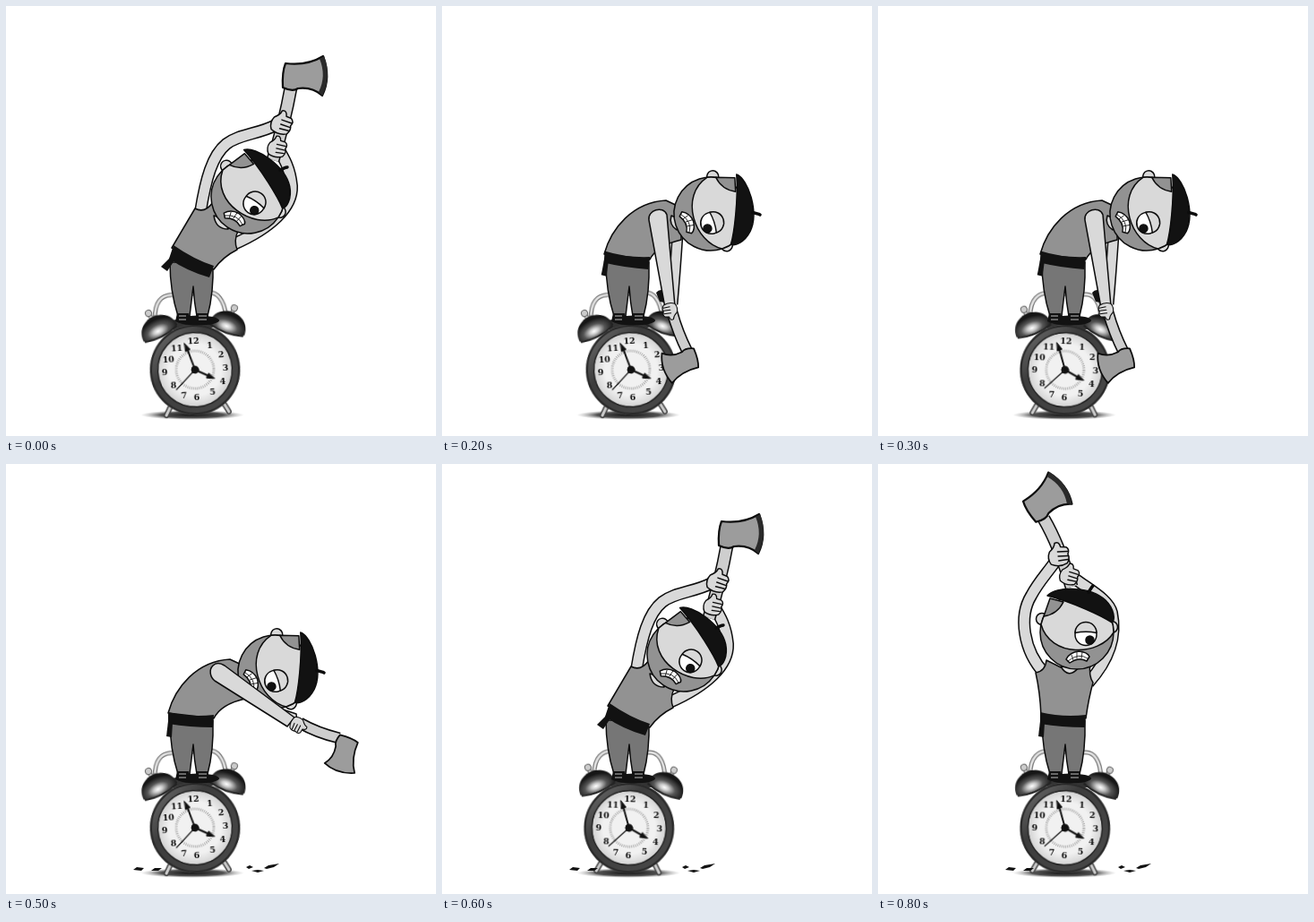
Recreate the animation shown at these times as an HTML page without scripts. Size 480 by 480 pixels, loop 0.9 s.

```html
<!DOCTYPE html>
<html lang="en">
<head>
<meta charset="utf-8">
<title>Chopping the alarm clock</title>
<style>
html, body { margin: 0; width: 100%; height: 100%; overflow: hidden; background: #fff; }
svg { display: block; width: 100%; height: 100%; }
.line { fill: none; }
.ink { stroke: #0c0c0c; stroke-width: 1.5; stroke-linejoin: round; stroke-linecap: round; }
.skin { fill: #d9d9d9; }
.shirt { fill: #929292; }
.pants { fill: #767676; }
.steel { fill: #9c9c9c; stroke-width: 2.2; }
.black { fill: #121212; }
.rim { fill: none; stroke: #0c0c0c; stroke-width: 14; }
.fill { fill: none; stroke: #d9d9d9; stroke-width: 11; }
.grip .rim { stroke-width: 15; }
.grip .fill { stroke: #cecece; stroke-width: 12; }
.thin .rim { stroke-width: 13; }
.thin .fill { stroke-width: 10; }
.num { font: 700 9.5px "DejaVu Serif", "Noto Serif", serif; text-anchor: middle; fill: #111; }

/* nine beats of 100 ms */
.pose, .chips, .clock { animation: 900ms step-end infinite; }
.pose, .chips { visibility: hidden; }
.raised { animation-name: raised; }
.lean { animation-name: lean; }
.swing { animation-name: swing; }
.hit { animation-name: hit; }
.fly { animation-name: fly; }
.fallen { animation-name: fallen; }
.clock { animation-name: wobble; transform-origin: 210px 406px; }
@keyframes raised { 0% { visibility: hidden } 88.8%, 100% { visibility: visible } }
@keyframes lean { 0%, 66.6% { visibility: visible } 11.1%, 88.8%, 100% { visibility: hidden } }
@keyframes swing { 0%, 22.2%, 66.6%, 100% { visibility: hidden } 11.1%, 55.5% { visibility: visible } }
@keyframes hit { 0%, 55.5%, 100% { visibility: hidden } 22.2% { visibility: visible } }
@keyframes fly { 0%, 55.5%, 100% { visibility: hidden } 44.4% { visibility: visible } }
@keyframes fallen { 0% { visibility: hidden } 55.5%, 100% { visibility: visible } }
@keyframes wobble {
  0%, 22.2%, 44.4%, 77.7% { transform: translate(1px, 0) rotate(-3.5deg) }
  11.1%, 33.3%, 66.6%, 88.8%, 100% { transform: translate(-1.2px, .2px) rotate(1.8deg) }
}
</style>
</head>
<body>
<svg viewBox="0 0 480 480">
<defs>
  <radialGradient id="chrome" cx=".47" cy=".72" r=".55">
    <stop offset="0" stop-color="#fff"/><stop offset=".22" stop-color="#ccc"/>
    <stop offset=".55" stop-color="#555"/><stop offset="1" stop-color="#161616"/>
  </radialGradient>
  <linearGradient id="ring" x2="1" y2="1">
    <stop offset="0" stop-color="#777"/><stop offset=".35" stop-color="#3c3c3c"/>
    <stop offset="1" stop-color="#4a4a4a"/>
  </linearGradient>
  <radialGradient id="dial">
    <stop offset=".7" stop-color="#f1f1f1"/><stop offset="1" stop-color="#d2d2d2"/>
  </radialGradient>
  <radialGradient id="shade">
    <stop offset="0" stop-color="#111"/><stop offset=".6" stop-color="#333" stop-opacity=".85"/>
    <stop offset="1" stop-color="#999" stop-opacity="0"/>
  </radialGradient>

  <g id="head" class="ink">
    <circle class="skin" cx="-39" cy="-15" r="6.500"/>
    <circle class="skin" cx="39" cy="-6" r="6.500"/>
    <circle class="shirt" r="41"/>
    <path class="skin" d="M-40 -9C-30 28 25 27 41 0A41 41 0 0 0 -40 -9z"/>
    <path class="shirt" d="M-37 -18Q-22 -20 -15 -34L-30 -38z"/>
    <circle cx="10" cy="2.500" r="12" fill="#fff"/>
    <path class="skin" d="M-2 .5A12 12 0 0 1 22 .5Q10 -2 -2 .5z"/>
    <circle class="black" cx="14.500" cy="8.500" r="4.500"/>
    <path d="M-12 30Q-8 22 2 21Q12 22 14 27L11 32Q2 27 -8 34z" fill="#fff"/>
    <path class="line" stroke-width=".8" d="M-10 32Q2 22 12 29M-6 25L-4 31M0 22V29M6 22L5 29"/>
    <path class="black" d="M-33 -41C-24 -52 15 -52 32 -36C42 -26 43 -14 39 -11C29 -18 -5 -34 -33 -41z"/>
    <path class="line" stroke-width="3.500" d="M13 -45L17 -51L18 -52"/>
  </g>

  <path id="axe" class="ink steel" d="M-6 -28Q18 -25 36 -36Q45 -12 35 8Q24 -2 8 0Q2 4 -9 -1Q-10 -18 -6 -28z"/>
  <path id="edge" fill="#2a2a2a" d="M32 -33L37 -36Q46 -12 35 8L31 4Q40 -14 32 -33z"/>

  <g id="fist" class="ink skin">
    <path d="M-9 -5Q-3 -9 -2 -14Q3 -16 4 -9L10 -8Q14 -5 11 0Q13 5 9 10Q0 14 -9 9Q-13 2 -9 -5z"/>
    <path class="line" d="M0 -4L11 -3M0 1L11 2M0 6L10 6"/>
  </g>

  <g id="bell">
    <path d="M-21 0C-21 -27 21 -27 21 0Q0 7 -21 0z" fill="url(#chrome)"/>
    <path d="M-20 1Q0 7 20 1" fill="none" stroke="#222" stroke-width="2"/>
  </g>
  <g id="knob" fill="#ccc" stroke="#666">
    <path d="M-2 2H2V13H-2z"/><circle r="3.500"/><path d="M-5 6H5V9H-5z"/>
  </g>

  <g id="belt">
    <path class="black" d="M181 277Q206 283 232 280L231 294Q205 294 181 290z"/>
    <path class="black" d="M181 287L179 304L185 305L186 289z"/>
  </g>
  <path id="bent" class="ink shirt" d="M181 278C189 249 213 220 250 218L267 226V262Q240 268 232 284z"/>

  <path id="armA1" d="M186 234C162 208 157 170 171 147C179 132 187 124 197 110"/>
  <path id="armA2" d="M235 244C261 215 266 190 261 166C257 151 238 142 217 126"/>
  <path id="gripA" d="M216 137Q202 90 185 61"/>
  <path id="armB1" d="M217 230C223 193 230 167 246 154C260 143 282 143 301 133"/>
  <path id="armB2" d="M254 266C295 248 320 225 319 201C317 181 311 171 303 158"/>
  <path id="gripB" d="M298 172Q311 130 318 91"/>
  <path id="gripC" d="M328 289Q347 300 372 306"/>
  <path id="gripD" d="M257 342Q263 364 274 386"/>
  <path id="armD" d="M263 255Q260 300 257 333"/>
  <path id="arch" d="M169 347C169 328 178 321 188 321H231C240 321 247 330 248 347"/>
  <path id="feet" d="M182 442L175 455M238 442L245 455"/>
</defs>

<rect width="480" height="480" fill="#fff"/>
<ellipse cx="208" cy="456.500" rx="58" ry="5.500" fill="url(#shade)"/>

<g class="clock">
  <g fill="none" stroke-linecap="round">
    <use href="#arch" stroke="#777" stroke-width="5"/>
    <use href="#arch" stroke="#e2e2e2" stroke-width="2.500"/>
    <use href="#feet" stroke="#444" stroke-width="6"/>
    <use href="#feet" stroke="#ccc" stroke-width="3"/>
  </g>
  <use href="#knob" transform="translate(162 340) rotate(-28)"/>
  <use href="#knob" transform="translate(258 340) rotate(28)"/>
  <path d="M188 349H232L237 360H184z" fill="#333"/>
  <use href="#bell" transform="translate(174 363) rotate(-24)"/>
  <use href="#bell" transform="translate(248 363) rotate(24)"/>
  <circle cx="210" cy="406" r="50.500" fill="url(#ring)"/>
  <circle cx="210" cy="406" r="49" fill="none" stroke="#292929" stroke-width="2"/>
  <circle cx="210" cy="406" r="41.500" fill="url(#dial)" stroke="#222" stroke-width="1.500"/>
  <circle cx="210" cy="406" r="21" fill="none" stroke="#999" stroke-width="3" stroke-dasharray=".8 1.400"/>
  <g class="num">
    <text x="210" y="377">12</text><text x="228" y="383">1</text><text x="240" y="394">2</text>
    <text x="244" y="409">3</text><text x="240" y="424">4</text><text x="228" y="435">5</text>
    <text x="210" y="440">6</text><text x="196" y="437">7</text><text x="185" y="425">8</text>
    <text x="176" y="410">9</text><text x="181" y="396">10</text><text x="191" y="384">11</text>
  </g>
  <g stroke="#111" fill="#111" stroke-linecap="round">
    <path d="M210 406L188 427" stroke-width="1.100"/>
    <path d="M210 406L202 380M210 406L227 415" stroke-width="2"/>
    <path d="M200 376L206 383L201 385zM231 417L222 416L225 411z"/>
    <circle cx="210" cy="406" r="4"/>
  </g>
</g>

<g class="chips fly black">
  <path d="M114 430l9 -5 3 4 -7 4zM130 441l8 -4 4 3 -7 4zM145 419l5 -5 3 5z"/>
  <path d="M272 437l7 -4 6 3 -8 4zM291 424l10 -6 4 2 -9 6zM286 446l6 -2 4 3z"/>
</g>
<g class="chips fallen black">
  <path d="M142 453l4 -3 8 1 -3 3zM162 454l4 -3 8 0 -4 3z"/>
  <path d="M268 450l4 -2 4 2 -5 2zM274 454l7 -1 7 1 -7 2zM288 451l5 -3 12 -2 -6 4 -8 2z"/>
</g>

<!-- legs and shoes -->
<ellipse class="black" cx="214" cy="351" rx="24" ry="5.500"/>
<path class="ink pants" d="M183 286Q183 318 192 346H205Q207 330 209 313Q210 330 213 346H225Q232 320 231 286z"/>
<path class="black" d="M191 343H204V352Q197 356 189 352zM212 343H226V352Q219 357 212 354z"/>
<path d="M193 346H201M193 350H201M215 346H224M215 350H224" stroke="#bbb" stroke-width="1"/>

<g class="pose raised">
  <use href="#armA1" class="rim"/><use href="#armA1" class="fill"/>
  <use href="#armA2" class="rim"/><use href="#armA2" class="fill"/>
  <path class="ink shirt" d="M176 233Q187 231 188 219L204 227H226L237 222Q235 237 240 244Q235 262 232 284L182 281Q181 255 176 233z"/>
  <path class="ink skin" d="M204 226Q213 241 224 227z"/>
  <use href="#belt"/>
  <g class="grip"><use href="#gripA" class="rim"/><use href="#gripA" class="fill"/></g>
  <g transform="translate(184 60) rotate(-38)"><use href="#axe"/><use href="#edge"/></g>
  <use href="#fist" transform="translate(201 102) rotate(-8)"/>
  <use href="#fist" transform="translate(213 124) rotate(12) scale(.9)"/>
  <use href="#head" transform="translate(222 188)"/>
</g>

<g class="pose lean">
  <use href="#armB1" class="rim"/><use href="#armB1" class="fill"/>
  <use href="#armB2" class="rim"/><use href="#armB2" class="fill"/>
  <path class="ink shirt" d="M211 226Q222 232 231 219L240 245L259 251Q254 262 258 272Q242 280 232 294L185 270Q198 248 211 226z"/>
  <path class="ink skin" d="M232 234Q234 249 248 249L245 238z"/>
  <path class="black" d="M187 267Q210 283 232 290L227 303Q202 296 182 282z"/>
  <path class="black" d="M184 280L173 291L180 296L188 284z"/>
  <g class="grip"><use href="#gripB" class="rim"/><use href="#gripB" class="fill"/></g>
  <g transform="translate(318 92)"><use href="#axe"/><use href="#edge"/></g>
  <use href="#fist" transform="translate(307 131) rotate(14)"/>
  <use href="#fist" transform="translate(302 158) rotate(8) scale(.9)"/>
  <use href="#head" transform="translate(270 213) rotate(34)"/>
</g>

<g class="pose swing">
  <path class="ink skin" d="M300 271L324 279L325 287L311 284z"/>
  <use href="#bent"/>
  <use href="#belt"/>
  <use href="#head" transform="translate(300 232) rotate(72)"/>
  <g class="grip thin"><use href="#gripC" class="rim"/><use href="#gripC" class="fill"/></g>
  <use href="#axe" transform="translate(370 309) rotate(107) scale(.8)"/>
  <path class="ink skin" d="M231 225C226 230 228 238 233 242L314 293L322 283L244 225Q236 220 231 225z"/>
  <use href="#fist" transform="translate(326 291) rotate(112) scale(.72)"/>
</g>

<g class="pose hit">
  <path class="black" d="M239 320Q243 315 248 318V331L243 330z"/>
  <g class="thin"><use href="#armD" class="rim"/><use href="#armD" class="fill"/></g>
  <use href="#bent" transform="translate(0 -1)"/>
  <use href="#belt" transform="rotate(4 232 284)"/>
  <path class="ink skin" d="M256 234Q253 244 262 250L266 238z"/>
  <use href="#head" transform="translate(300 232) rotate(72)"/>
  <g class="grip thin"><use href="#gripD" class="rim"/><use href="#gripD" class="fill"/></g>
  <use href="#axe" transform="translate(274 384) rotate(160) scale(.8)"/>
  <path class="ink skin" d="M231 239C229 228 247 222 251 233L260 335L249 337z"/>
  <use href="#fist" transform="translate(255 340) rotate(168) scale(.72)"/>
</g>
</svg>
</body>
</html>
```
